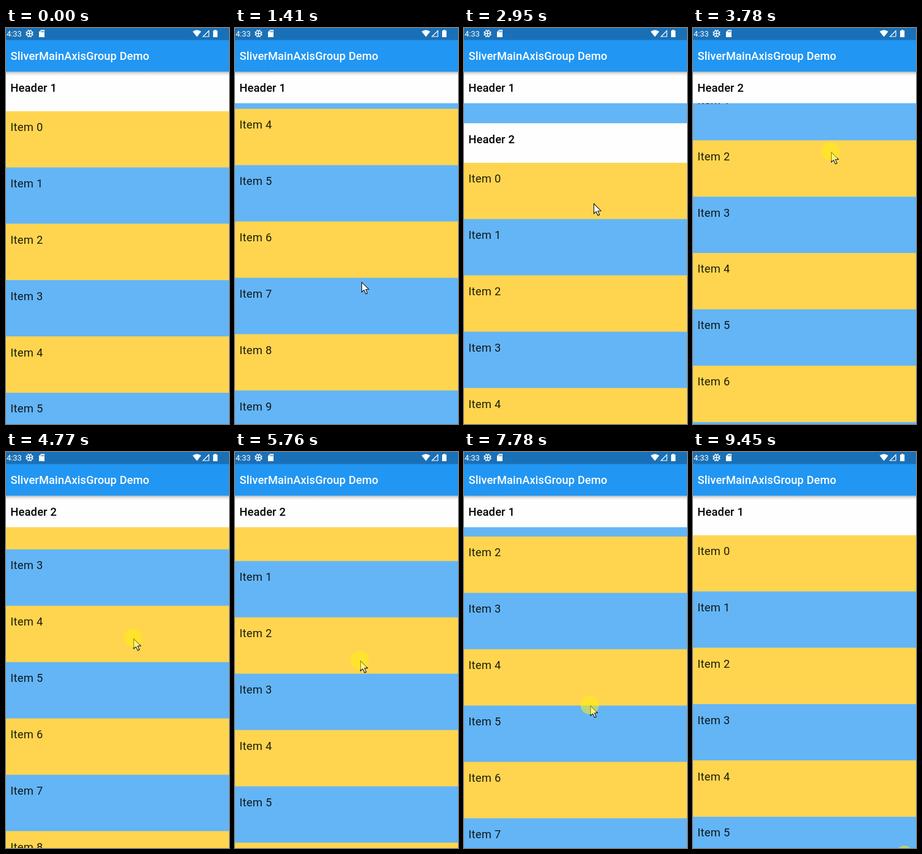
These frames come from a looping animation (365 px wide and 646 px high, 9.51 s). An HTML page with a canvas:

```html
<!DOCTYPE html>
<html lang="en">
<head>
<meta charset="utf-8">
<title>SliverMainAxisGroup Demo</title>
<style>
html, body { margin: 0; width: 100%; height: 100%; overflow: hidden; background: #fff; }
canvas { display: block; }
</style>
</head>
<body>
<canvas id="stage" width="365" height="646"></canvas>
<script>
const g = document.getElementById('stage').getContext('2d');
const W = 365, H = 646, LOOP = 9510;
const U = 0.919;                        // pixels per layout unit
const TOP = 71.2, ITEM = 100 * U, TALL = 70 * U, SHORT = 56 * U, COUNT = 10;
const GROUP = TALL + COUNT * ITEM;
const AMBER = '#ffd54f', BLUE = '#64b5f6';

// Drags: press, release, scroll from/to, pointer from x,y to x,y
const drags = [
  [430, 810, 0, 250, 258, 503, 222, 250],
  [1470, 1830, 371.4, 580, 206.6, 418, 216, 209],
  [2480, 2800, 680, 870, 200, 455, 210.5, 265],
  [3450, 3830, 923.2, 1148.4, 222, 420, 226.6, 170],
  [4440, 4800, 1300, 1230, 215, 240, 208, 310],
  [5440, 5830, 1180, 1001.3, 207, 195, 204.6, 371.7],
  [6430, 6880, 800, 525.8, 208, 172, 212.4, 446.4],
  [7450, 7850, 380, 140, 205, 215, 207, 455],
  [8560, 8560, 0, 0, 201, 548, 201, 548]
];

const clamp = (v, a, b) => Math.min(b, Math.max(a, v));
const part = (t, a, b) => b > a ? clamp((t - a) / (b - a), 0, 1) : 1;
const mix = (a, b, p) => a + (b - a) * p;
const smooth = p => p * p * (3 - 2 * p);
const out = p => 1 - (1 - p) ** 3;

function pose(t) {
  if (t < drags[0][0]) {
    const p = out(part(t, 70, 330));
    return { scroll: 0, x: mix(327, 258, p), y: mix(626, 503, p), shown: t >= 70 };
  }
  if (t >= 8560) {
    if (t >= 9450) return { scroll: 0, x: 347, y: 658, shown: true, down: true };
    const p = part(t, 8560, 8700), q = part(t, 8700, 8800);
    return { scroll: 0, x: mix(mix(201, 217, p), 300, q), y: mix(mix(548, 597, p), 670, q), shown: t < 8800 };
  }
  const i = drags.findLastIndex(d => t >= d[0]);
  const [a, b, s0, s1, x0, y0, x1, y1] = drags[i];
  if (t < b) {
    const p = part(t, a, b);
    return { scroll: mix(s0, s1, p), x: mix(x0, x1, p), y: mix(y0, y1, p), shown: true, down: true };
  }
  const next = drags[i + 1], p = part(t, b, next[0]), e = smooth(p);
  return { scroll: mix(s1, next[2], out(p)), x: mix(x1, next[4], e), y: mix(y1, next[5], e), shown: true };
}

function rect(x, y, w, h, color) {
  g.fillStyle = color;
  g.fillRect(x, y, w, h);
}

function label(text, x, y, color, weight = 400, size = 20 * U, spacing = 0.23) {
  g.font = `${weight} ${size}px Roboto, sans-serif`;
  g.letterSpacing = spacing + 'px';
  g.fillStyle = color;
  g.fillText(text, x, y);
}

function shape(points, fill, stroke, width = 1) {
  g.beginPath();
  points.forEach(([x, y]) => g.lineTo(x, y));
  g.closePath();
  if (fill) { g.fillStyle = fill; g.fill(); }
  if (stroke) { g.strokeStyle = stroke; g.lineWidth = width; g.stroke(); }
}

function group(n, scroll) {
  const start = TOP + n * GROUP - scroll, end = start + GROUP;
  for (let i = 0; i < COUNT; i++) {
    const y = start + TALL + i * ITEM;
    if (y > H || y + ITEM < TOP) continue;
    rect(0, y, W, ITEM + 0.5, i % 2 ? BLUE : AMBER);
    label('Item ' + i, 7.35, y + 32.4, 'rgba(0,0,0,.87)');
  }
  // The header shrinks, pins, then leaves with the end of its group
  const y = Math.min(Math.max(TOP, start), end - SHORT);
  if (y > H || y + SHORT < TOP) return;
  rect(0, y, W, clamp(TALL - (TOP - start), SHORT, TALL), '#fefefe');
  label('Header ' + (n + 1), 7.35, y + 32.3, '#000', 500, 20 * U, 0.14);
}

function statusBar() {
  rect(0, 0, W, 19.6, '#1a70b7');
  label('4:33', 1, 14, '#fff', 400, 12.9, 0);
  g.strokeStyle = '#fff';
  g.lineWidth = 1.4;
  g.beginPath();
  g.arc(38.5, 9, 4.6, 0, 7);
  g.moveTo(34, 9); g.lineTo(43, 9);
  g.moveTo(38.5, 4.5); g.lineTo(38.5, 13.5);
  g.stroke();
  g.lineWidth = 1.8;
  g.beginPath();
  for (let i = 0; i < 8; i++) {
    const a = (i + 0.5) * Math.PI / 4, c = Math.cos(a), s = Math.sin(a);
    g.moveTo(38.5 + 5 * c, 9 + 5 * s);
    g.lineTo(38.5 + 6.5 * c, 9 + 6.5 * s);
  }
  g.stroke();
  shape([[54, 6.5], [57.5, 3], [63, 3], [63, 15], [54, 15]], '#fff');
  for (let i = 0; i < 3; i++) rect(57.2 + i * 1.9, 4.5, 1, 2.6, '#1a70b7');
  g.fillStyle = '#fff';
  g.beginPath();
  g.moveTo(312.5, 14.5);
  g.lineTo(305.5, 5.8);
  g.quadraticCurveTo(312.5, 0.8, 319.5, 5.8);
  g.fill();
  shape([[332, 4.5], [332, 14], [322.5, 14]], null, '#fff', 1.2);
  rect(339, 4.2, 7.2, 10.8, '#fff');
  rect(341, 3, 3.2, 1.5, '#fff');
}

function appBar() {
  const shade = g.createLinearGradient(0, TOP, 0, TOP + 7);
  shade.addColorStop(0, 'rgba(0,0,0,.3)');
  shade.addColorStop(0.4, 'rgba(0,0,0,.11)');
  shade.addColorStop(1, 'rgba(0,0,0,0)');
  rect(0, TOP, W, 7, shade);
  rect(0, 0, W, TOP, '#2196f3');
  label('SliverMainAxisGroup Demo', 7.6, 52, '#fff', 500, 20 * U, 0.09);
  statusBar();
}

function pointer({ x, y, down }) {
  const arrow = [[0, 0], [0, 16], [3.7, 12.7], [6.6, 19], [9.2, 17.9], [6.5, 11.7], [11.4, 11.5]];
  shape(arrow.map(([dx, dy]) => [x + 0.5 + dx, y + 0.5 + dy]), '#fff', '#111', 1.1);
  if (!down) return;
  g.fillStyle = 'rgba(255,238,20,.55)';
  g.beginPath();
  g.arc(x - 0.8, y - 0.8, 15, 0, 7);
  g.fill();
}

function draw(t) {
  const p = pose(t);
  rect(0, 0, W, H, '#fefefe');
  group(0, p.scroll);
  group(1, p.scroll);
  appBar();
  if (p.shown) pointer(p);
}

const began = performance.now();
function tick() {
  draw((performance.now() - began) % LOOP);
  requestAnimationFrame(tick);
}
tick();
</script>
</body>
</html>
```
